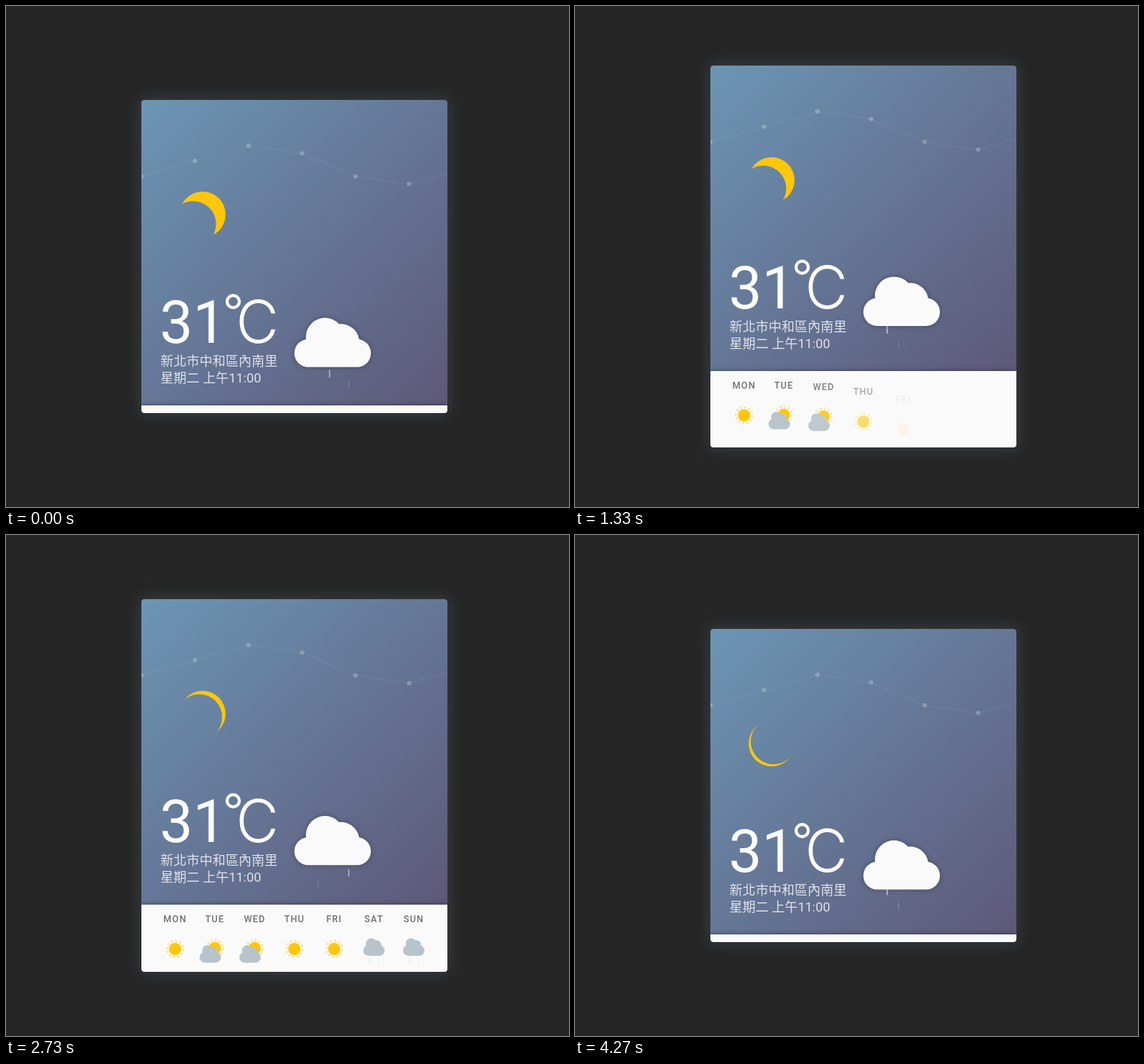
Animation, 736 px wide and 656 px high, one loop 4.34 s. Source, as an HTML page:

```html
<!DOCTYPE html>
<html lang="zh-Hant">
<head>
<meta charset="utf-8">
<style>
  html, body { margin: 0; width: 100%; height: 100%; overflow: hidden; background: #262626; }
  #card {
    position: absolute; left: 177px; width: 400px; overflow: hidden; border-radius: 4px;
    box-shadow: 0 0 20px 1px rgba(115, 145, 165, .25);
  }
  svg { display: block; font-family: Roboto, "Noto Sans CJK TC", "Noto Sans CJK", sans-serif; }
  .place { font-size: 17px; font-weight: 300; fill: #fff; fill-opacity: .8; }
  .place tspan { font-weight: 400; }
  .day { font-size: 12px; font-weight: 500; letter-spacing: 1px; fill: #707070; text-anchor: middle; }
  #cloud { filter: drop-shadow(0 0 3px rgba(0, 0, 0, .3)); }
  #panel { filter: drop-shadow(0 0 3px rgba(0, 0, 0, .4)); }
</style>
</head>
<body>
<div id="card">
  <svg width="400" height="500">
    <defs>
      <linearGradient id="sky" x2="1" y2="1">
        <stop stop-color="#6c95b4"/><stop offset="1" stop-color="#5e5878"/>
      </linearGradient>
      <mask id="phase">
        <circle cx="80" cy="150" r="32" fill="#fff"/>
        <circle id="shade" cx="80" cy="150" r="30"/>
      </mask>
      <g id="sun" fill="#ffc70b">
        <circle r="10.5" fill="none" stroke="#ffc70b" stroke-opacity=".4" stroke-width="3"
          pathLength="24" stroke-dasharray="1"/>
        <circle r="8"/>
      </g>
      <g id="mini" fill="#b8c4cb">
        <circle cx="10.5" cy="7" r="7"/><circle cx="17.5" cy="8.5" r="6"/>
        <rect y="9" width="28" height="14" rx="7"/>
      </g>
    </defs>
    <rect width="400" height="400" fill="url(#sky)"/>
    <g id="graph" fill="#fff" fill-opacity=".22"></g>
    <circle cx="80" cy="150" r="30" fill="#ffc70b" mask="url(#phase)"/>
    <g fill="#fff">
      <text x="24" y="318" font-size="77">31</text>
      <circle cx="120" cy="264" r="8" fill="none" stroke="#fff" stroke-width="4"/>
      <text x="151.5" y="318" font-size="77" text-anchor="middle"
        style="font-family:Inter,sans-serif;font-weight:300">C</text>
    </g>
    <text class="place" x="25" y="348">新北市中和區內南里</text>
    <text class="place" x="25" y="370">星期二 上午<tspan>11:00</tspan></text>
    <g id="weather">
      <g id="rain" fill="#fff"></g>
      <g id="cloud" fill="#fafafa">
        <circle cx="240" cy="25" r="25"/><circle cx="261" cy="32" r="24"/>
        <rect x="200" y="28" width="100" height="36.5" rx="18"/>
      </g>
    </g>
    <rect id="panel" y="400" width="400" height="100" fill="#fafafa"/>
    <g id="week"></g>
  </svg>
</div>
<script>
const LOOP = 4340, OPEN = 785, CLOSE = 2680, FADE = 400;
const $ = id => document.getElementById(id);

// Temperature curve
const temps = [100, 80, 60, 70, 100, 110, 90].map((y, i) => [70 * i, y]);
$('graph').innerHTML =
  `<polyline points="${temps.join(' ')}" fill="none" stroke="#fff" stroke-opacity=".07"/>` +
  temps.map(([x, y]) => `<circle cx="${x}" cy="${y}" r="3"/>`).join('');

// Forecast row
const icons = {
  sun: '<use href="#sun" y="458"/>',
  partly: '<use href="#sun" y="457"/><use href="#mini" x="-20" y="453"/>',
  rain: '<g class="drizzle" fill="#b8c4cb"></g><use href="#mini" x="-14" y="444"/>'
};
const week = {
  MON: 'sun', TUE: 'partly', WED: 'partly', THU: 'sun', FRI: 'sun', SAT: 'rain', SUN: 'rain'
};
$('week').innerHTML = Object.entries(week)
  .map(([day, icon]) => `<g><text class="day" y="423">${day}</text>${icons[icon]}</g>`).join('');
const days = [...$('week').children];

// CSS "ease" curve: cubic-bezier(.25, .1, .25, 1)
function ease(x) {
  if (x <= 0) return 0;
  if (x >= 1) return 1;
  const bez = (a, b, s) => 3 * a * s * (1 - s) ** 2 + 3 * b * s * s * (1 - s) + s ** 3;
  let lo = 0, hi = 1;
  for (let i = 0; i < 20; i++) {
    const mid = (lo + hi) / 2;
    if (bez(.25, .25, mid) < x) lo = mid; else hi = mid;
  }
  return bez(.1, 1, lo);
}

const shown = (t, delay) =>
  ease((t - OPEN - delay) / FADE) - ease((t - CLOSE - delay) / FADE);

// drops: [x, phase]; each falls and fades once per second
function drops(list, sec, top, fall, w, h) {
  return list.map(([x, phase]) => {
    const p = (sec + phase) % 1;
    return `<rect x="${x - w / 2}" y="${top + fall * p - h / 2}" width="${w}" height="${h}" opacity="${1 - p}"/>`;
  }).join('');
}

function draw() {
  const t = performance.now() % LOOP, sec = t / 1000;

  const height = 410 + 90 * shown(t, 0);
  $('card').style.height = height + 'px';
  $('card').style.top = 328 - height / 2 + 'px';

  const shift = 4.6 * Math.abs(sec - .5) - 14.7;
  $('shade').setAttribute('cx', 80 + shift);
  $('shade').setAttribute('cy', 150 - shift);

  const bob = 280.5 + 5 * Math.cos((sec - .13) * Math.PI * 2 / 3);
  $('weather').setAttribute('transform', `translate(0 ${bob})`);
  $('rain').innerHTML = drops([[231, .2], [246, .6], [271, .9]], sec, 43, 50, 2, 10);

  days.forEach((day, i) => {
    const p = shown(t, 110 + 100 * i);
    day.setAttribute('transform', `translate(${44 + 52 * i} ${20 * (1 - p)})`);
    day.setAttribute('opacity', p);
  });
  const drizzle = drops([[-6, .9], [0, .58], [6, .08]], sec, 457, 24, 1.5, 4);
  document.querySelectorAll('.drizzle').forEach(g => g.innerHTML = drizzle);

  requestAnimationFrame(draw);
}
draw();
</script>
</body>
</html>
```
